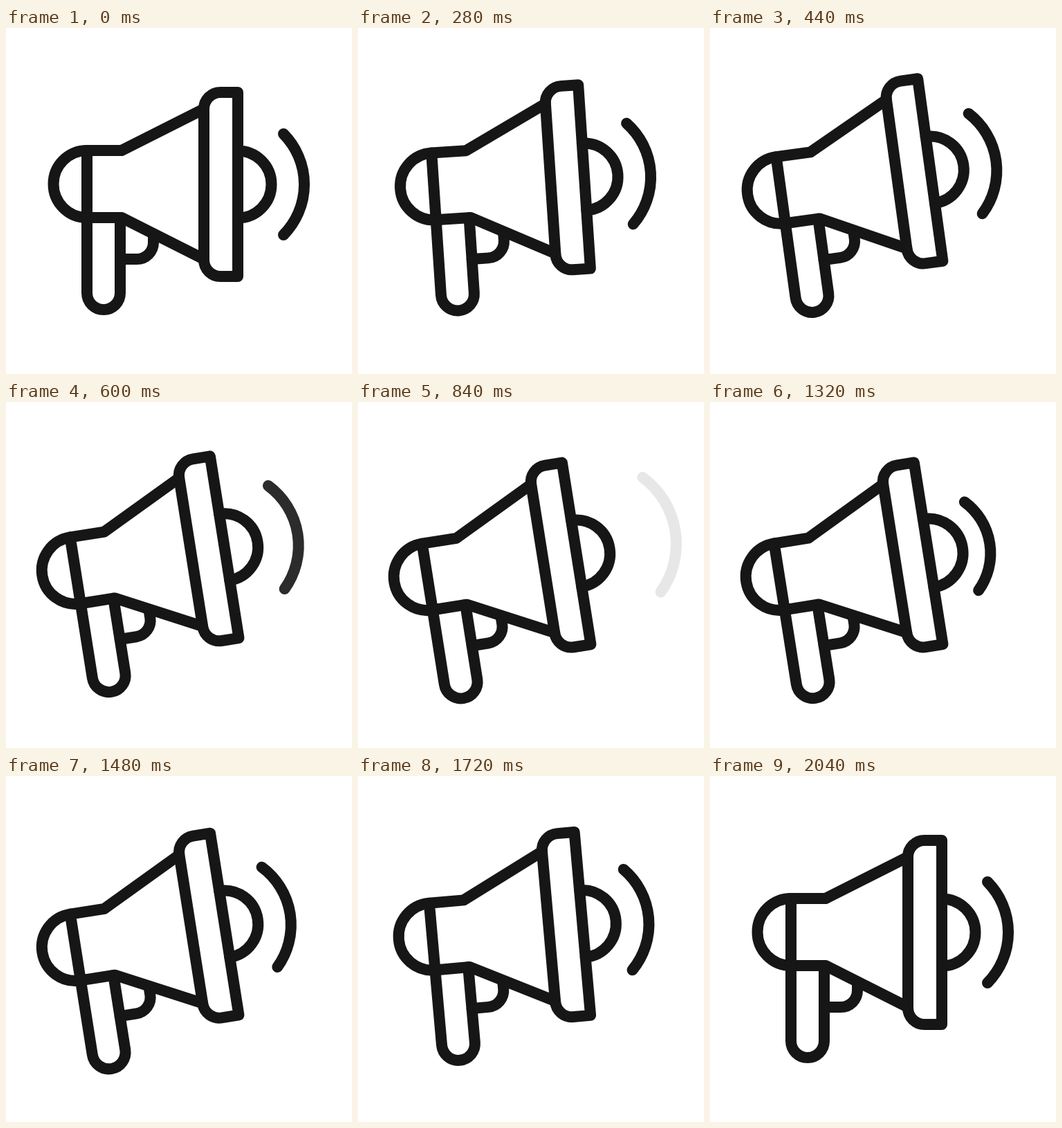
An HTML page that plays this animation: 500 px wide and 500 px high, repeating every 2160 ms.

```html
<!DOCTYPE html>
<html lang="en">
<head>
<meta charset="utf-8">
<title>Megaphone</title>
<style>
  html, body { margin: 0; width: 100%; height: 100%; overflow: hidden; background: #fff; }
  svg { display: block; width: 100vw; height: 100vh; }
</style>
</head>
<body>
<svg viewBox="0 0 500 500" fill="none" stroke="#161616" stroke-width="16"
     stroke-linecap="round" stroke-linejoin="round">
  <g id="horn">
    <path d="M335 93H310A24 24 0 0 0 286 117V335A24 24 0 0 0 310 359H335Z"/>
    <path d="M286 117L167 177H117V274H167L286 334"/>
    <path d="M117 177A48.5 48.5 0 0 0 117 274"/>
    <path d="M117 274V383A24 24 0 0 0 165 383V274"/>
    <path d="M165 334H189A24 24 0 0 0 213 310V299"/>
    <path id="cap" d="M335 177.5A48.5 48.5 0 0 1 335 274.5"/>
    <path id="wave" d="M401 153A103.8 103.8 0 0 1 401 299"/>
  </g>
</svg>
<script>
  const LOOP = 2160, STEP = 40, STROKE = 16;
  const [horn, cap, wave] = ['horn', 'cap', 'wave'].map(id => document.getElementById(id));

  const smooth = p => (1 - Math.cos(Math.PI * p)) / 2;
  const easeOut = p => 1 - (1 - p) ** 2;
  const linear = p => p;
  const square = p => p * p;
  const hold = () => 0;

  // Each row: time, value, easing towards this row
  const tracks = {
    tilt: [[50, 0], [560, -9, smooth], [1455, -9], [2030, 0, smooth]],
    lift: [[50, 0], [500, -11, smooth], [960, 6, easeOut], [1200, 6],
           [1740, -5.6, smooth], [2040, 0, smooth]],
    capSize: [[900, 1], [1130, 1.11, smooth], [1420, 1, smooth]],
    waveX: [[480, 0], [860, 46, smooth], [1040, -9.5, hold], [1480, 0, smooth]],
    waveY: [[480, 0], [860, -10, smooth], [1040, -2, hold], [1480, 0, smooth]],
    waveSize: [[480, 1], [860, 1.15, smooth], [1040, 0.61, hold], [1480, 1, smooth]],
    waveAlpha: [[480, 1], [860, 0, square], [1040, 0], [1300, 1, linear]]
  };

  function at(track, t) {
    if (t <= track[0][0]) return track[0][1];
    for (let i = 1; i < track.length; i++) {
      const [t0, v0] = track[i - 1];
      const [t1, v1, ease = linear] = track[i];
      if (t < t1) return v0 + (v1 - v0) * ease((t - t0) / (t1 - t0));
    }
    return track[track.length - 1][1];
  }

  // Scale about (x, y) with a constant line weight, then move by (dx, dy)
  function resize(el, x, y, size, dx = 0, dy = 0) {
    el.setAttribute('transform',
      `translate(${x + dx} ${y + dy}) scale(${size}) translate(${-x} ${-y})`);
    el.setAttribute('stroke-width', STROKE / size);
  }

  function draw(t) {
    const v = {};
    for (const name in tracks) v[name] = at(tracks[name], t);
    horn.setAttribute('transform', `translate(0 ${v.lift}) rotate(${v.tilt} 250 343)`);
    resize(cap, 335, 240, v.capSize);
    resize(wave, 401, 226, v.waveSize, v.waveX, v.waveY);
    wave.setAttribute('opacity', v.waveAlpha);
  }

  const start = performance.now();
  function tick() {
    const t = (performance.now() - start) % LOOP;
    draw(Math.floor(t / STEP) * STEP);
    requestAnimationFrame(tick);
  }
  tick();
</script>
</body>
</html>
```
